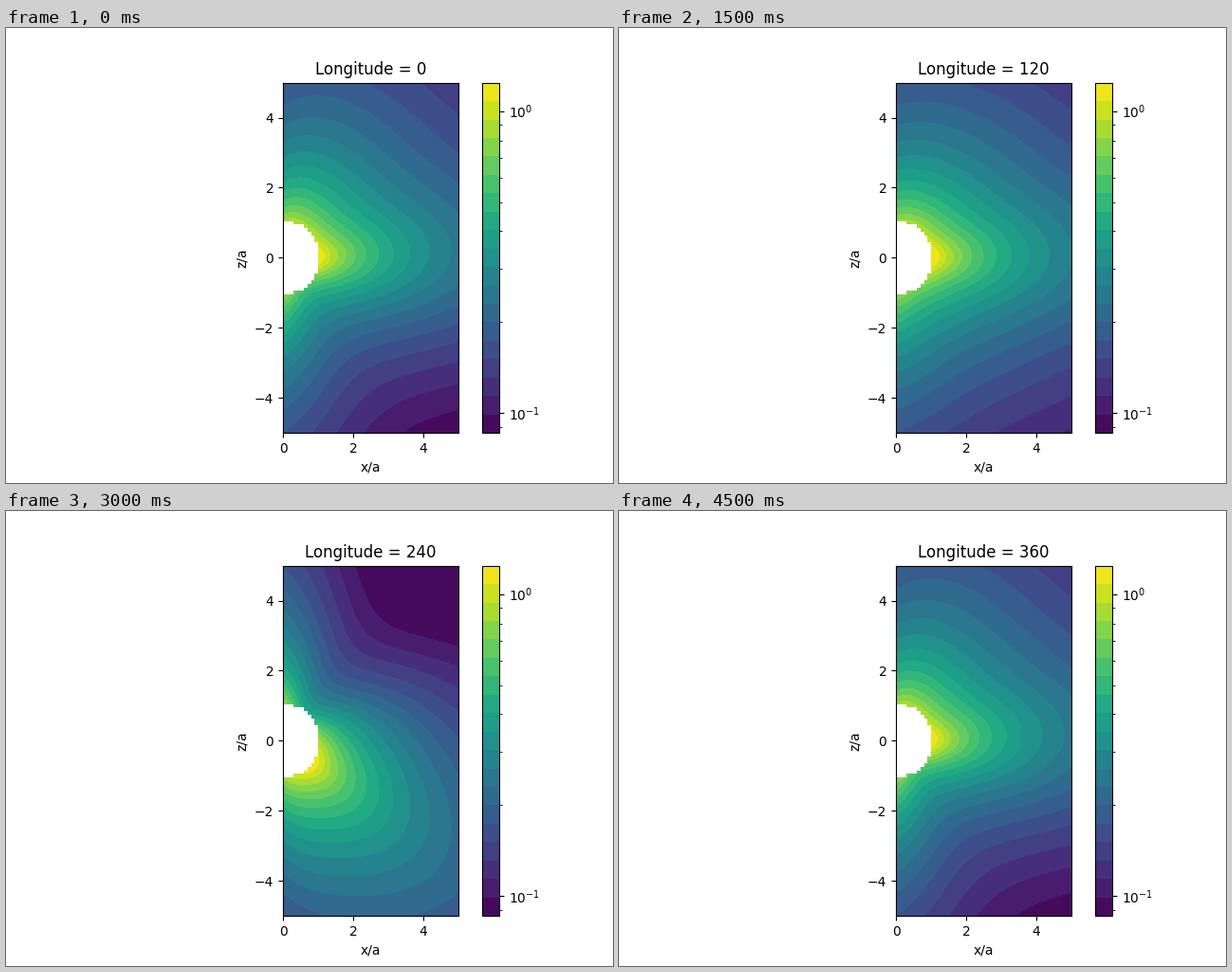
Animation, 640 px wide and 480 px high, one loop 5 s. Source, as a matplotlib script:

```python
import numpy as np
import matplotlib.pyplot as plt
from matplotlib.animation import FuncAnimation
from matplotlib.colors import LogNorm
from matplotlib.ticker import LogFormatterSciNotation, LogLocator, NullFormatter

LOW, HIGH = 0.0858, 1.243
LEVELS = np.geomspace(LOW, HIGH, 20)
STEP = 40  # degrees of longitude per frame

X, Z = np.meshgrid(np.linspace(0, 5, 50), np.linspace(-5, 5, 100))
R = np.hypot(X, Z)
SIN, COS = Z / R, X / R


def lobe(lon, lat0, lon0, sharp):
    """Bump of height 1 around an axis, the same at both of its ends."""
    lat0 = np.radians(lat0)
    dot = SIN * np.sin(lat0) + COS * np.cos(lat0) * np.cos(np.radians(lon - lon0))
    return np.exp(sharp * (dot**2 - 1))


def field(lon):
    """A 1/r fall-off shaped by a belt, a hollow, a bulge and the poles."""
    belt = 0.28 * (1 + np.cos(2 * np.radians(lon - 150))) * np.exp(-5 * SIN**2)
    hollow = 0.84 * lobe(lon, -52, 45, 2.4)
    bulge = 0.44 * lobe(lon, 38, 66, 3)
    poles = 0.22 * lobe(lon, 90, 0, 4)
    f = np.exp(belt + bulge + poles - hollow - 0.1) / R
    # the end colours also cover values beyond the scale
    f = np.clip(f, LOW * 1.0001, HIGH * 0.9999)
    return np.ma.masked_where(R < 1, f)


def draw(i):
    lon = STEP * i
    ax.cla()
    filled = ax.contourf(X, Z, field(lon), levels=LEVELS, cmap="viridis",
                         norm=LogNorm(LOW, HIGH), corner_mask=False)
    ax.set(aspect="equal", xlabel="x/a", ylabel="z/a",
           title=f"Longitude = {lon}")
    return filled


fig, ax = plt.subplots(figsize=(6.4, 4.8), dpi=100)
bar = fig.colorbar(draw(0), ax=ax, ticks=LogLocator(),
                   format=LogFormatterSciNotation())
bar.ax.yaxis.set_minor_locator(LogLocator(subs=range(2, 10)))
bar.ax.yaxis.set_minor_formatter(NullFormatter())

anim = FuncAnimation(fig, draw, frames=10, interval=500,
                     init_func=lambda: draw(0), repeat=True, repeat_delay=0)
plt.show()
```
